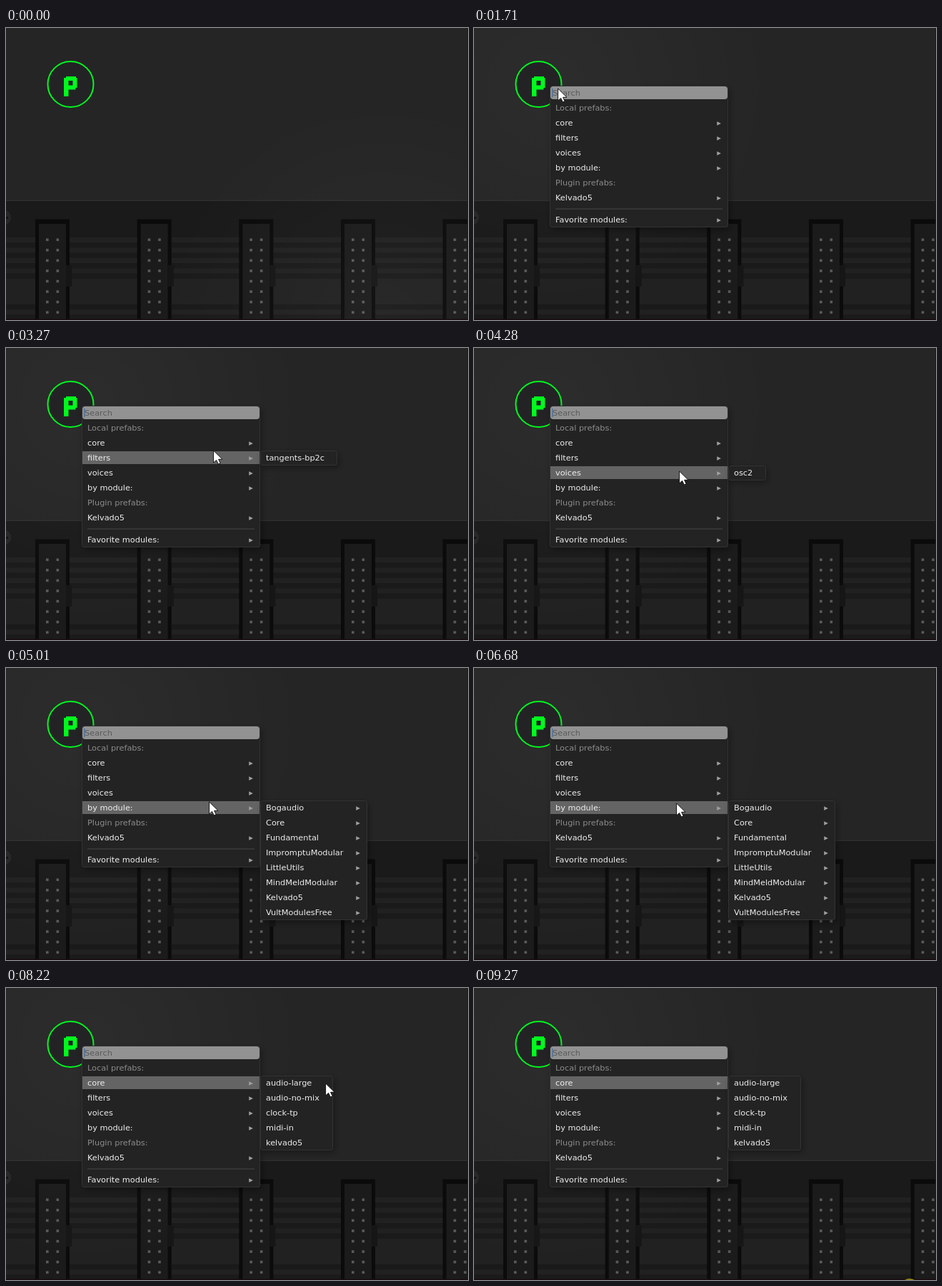
Write an HTML page with a canvas that moves like this. It is 647x410 px and loops after 9.34 s.

```html
<!DOCTYPE html>
<html lang="en">
<head>
<meta charset="utf-8">
<title>Prefab menu</title>
<style>
html, body { margin: 0; width: 100%; height: 100%; overflow: hidden; background: #252525; }
canvas { display: block; }
</style>
</head>
<body>
<canvas id="stage" width="647" height="410"></canvas>
<script>
const W = 647, H = 410, LOOP = 9340, STEP = 69.9;
const MENU_AT = 1030, MENU_X = 107, MENU_Y = 82, MENU_W = 249, ROW = 21;
const g = document.getElementById('stage').getContext('2d');

// Pointer glides: start and end time, end point
const entry = [528, 411];
const glides = [
  [130, 760, MENU_X, MENU_Y],
  [1710, 2400, 291, 130],
  [3130, 3480, 291, 158],
  [3750, 3950, 288, 171],
  [4280, 4280, 288, 173],
  [4810, 5010, 284, 192],
  [6680, 7590, 286, 146],
  [7660, 7940, 360, 56],
  [8010, 8580, 565, 237],
  [8650, 9000, 610, 421]
];
const clicks = [[960, MENU_AT], [9270, LOOP]];

const items = ['Local prefabs:', 'core', 'filters', 'voices', 'by module:', 'Plugin prefabs:', 'Kelvado5'];
const submenus = {
  core: { w: 101, list: ['audio-large', 'audio-no-mix', 'clock-tp', 'midi-in', 'kelvado5'] },
  filters: { w: 107, list: ['tangents-bp2c'] },
  voices: { w: 52, list: ['osc2'] },
  'by module:': {
    w: 149, arrows: true,
    list: ['Bogaudio', 'Core', 'Fundamental', 'ImpromptuModular', 'LittleUtils',
      'MindMeldModular', 'Kelvado5', 'VultModulesFree']
  }
};
const rowY = i => MENU_Y + 30 + i * ROW;
const arrow = new Path2D('M-.4 0V17L3.6 13.4 6.3 19 9.2 17.8 6.6 12.3H12Z');

// Half linear, half smooth
const ease = k => (k + k * k * (3 - 2 * k)) / 2;

function pointer(t) {
  let [x, y] = entry;
  for (const [start, end, toX, toY] of glides) {
    if (t < start) break;
    const steps = Math.round((end - start) / STEP) + 1;
    const k = ease(Math.min(1, (Math.floor((t - start) / STEP) + 1) / steps));
    x += (toX - x) * k;
    y += (toY - y) * k;
  }
  return [Math.round(x), Math.round(y)];
}

// The item with a submenu that the pointer touched last
function activeItem(t) {
  for (let u = t; u > MENU_AT; u -= STEP) {
    const [x, y] = pointer(u);
    const item = items[Math.floor((y - rowY(0) + 10) / ROW)];
    if (submenus[item] && x >= MENU_X && x < MENU_X + MENU_W) return item;
  }
}

function rect(x, y, w, h, color) {
  g.fillStyle = color;
  g.fillRect(x, y, w, h);
}

function disc(x, y, r, color) {
  g.fillStyle = color;
  g.beginPath();
  g.arc(x, y, r, 0, 7);
  g.fill();
}

function label(text, x, y, color = '#eee', align = 'left') {
  g.font = '11.32px "DejaVu Sans", sans-serif';
  g.textAlign = align;
  g.fillStyle = color;
  g.fillText(text, x, y + 4);
}

function more(right, y) {
  label('▸', right, y, '#a0a0a0', 'right');
}

function panel(x, y, w, h) {
  g.save();
  g.shadowColor = 'rgba(0,0,0,.36)';
  g.shadowBlur = 10;
  g.shadowOffsetX = 2;
  g.shadowOffsetY = 3;
  g.fillStyle = '#232323';
  g.beginPath();
  g.roundRect(x, y, w, h, 3);
  g.fill();
  g.restore();
  g.strokeStyle = '#333';
  g.lineWidth = 1;
  g.beginPath();
  g.roundRect(x - .5, y - .5, w, h, 3);
  g.stroke();
}

function drawRack() {
  rect(0, 0, W, H, '#252525');
  rect(0, 242, W, H, '#1a1a1a');
  rect(0, 241.5, W, 1.5, '#2e2e2e');
  disc(-4, 266, 11, '#262626');
  rect(0, 265, 3, 3, '#111');
  for (let y = 294; y < H; y += 14.5) rect(0, y, W, 7, '#212121');
  rect(0, 353, W, 34, '#212121');
  for (let x = 41; x < W; x += 142.67) {
    rect(x, 268.5, 48, H, '#0b0b0b');
    rect(x + 5, 275, 38, H, '#1b1b1b');
    rect(x + 43, 333, 8, 30, '#161616');
    for (let y = 295.5; y < H; y += 14.57)
      for (const dx of [15, 29.5]) rect(x + dx, y, 3.6, 3.6, '#5a5a5a');
  }
}

function drawGlow(x, y) {
  const grad = g.createRadialGradient(x, y, 0, x, y, 310);
  grad.addColorStop(0, 'rgba(255,255,255,.035)');
  grad.addColorStop(1, 'rgba(255,255,255,0)');
  rect(0, 0, W, H, grad);
  rect(W - 1, 0, 1, H, '#181818');
  rect(0, H - 1.5, W, 1.5, '#1b0d12');
}

function drawBadge() {
  const green = '#00f91e';
  disc(90.5, 79, 32, '#232326');
  g.strokeStyle = green;
  g.lineWidth = 2;
  g.beginPath();
  g.arc(90.5, 79, 32, 0, 7);
  g.stroke();
  rect(81, 70, 6.5, 26, green);
  rect(84, 68, 14, 6, green);
  rect(93.5, 70, 6, 14, green);
  rect(86, 80.5, 11.5, 6, green);
}

function drawSubmenu(name) {
  const { w, list, arrows } = submenus[name];
  const x = MENU_X + MENU_W + 1, top = rowY(items.indexOf(name));
  panel(x, top - 9, w, list.length * ROW - 1);
  list.forEach((text, i) => {
    label(text, x + 7, top + i * ROW);
    if (arrows) more(x + w - 10, top + i * ROW);
  });
}

function drawMenu(active) {
  const right = MENU_X + MENU_W - 10;
  panel(MENU_X, MENU_Y, MENU_W, 198);
  g.fillStyle = '#929292';
  g.beginPath();
  g.roundRect(MENU_X, MENU_Y, MENU_W - 1, 18, 4);
  g.fill();
  rect(109, 85, 1.5, 12, '#4d6f9f');
  label('Search', 110, 91, '#5a5a5a');
  items.forEach((text, i) => {
    const y = rowY(i), heading = text.endsWith('prefabs:');
    if (text === active) rect(MENU_X, y - 9, MENU_W - 1, 18, '#646464');
    label(text, MENU_X + 7, y, heading ? '#8c8c8c' : '#eee');
    if (!heading) more(right, y);
  });
  rect(MENU_X + 7, 253.5, 234, 1, '#484848');
  label('Favorite modules:', MENU_X + 7, 269);
  more(right, 269);
  if (active) drawSubmenu(active);
}

function drawPointer(x, y) {
  g.save();
  g.translate(x, y);
  g.fillStyle = '#fff';
  g.strokeStyle = '#111';
  g.lineWidth = 1;
  g.fill(arrow);
  g.stroke(arrow);
  g.restore();
}

function draw(t) {
  const [x, y] = pointer(t), open = t >= MENU_AT;
  drawRack();
  if (open) drawGlow(MENU_X, MENU_Y);
  else drawGlow(x, y);
  drawBadge();
  if (open) drawMenu(activeItem(t));
  if (clicks.some(([from, to]) => t >= from && t < to)) disc(x, y, 13, 'rgba(225,215,20,.6)');
  drawPointer(x, y);
}

let began;
function loop(now) {
  began ??= now;
  draw((now - began) % LOOP);
  requestAnimationFrame(loop);
}
requestAnimationFrame(loop);
</script>
</body>
</html>
```
